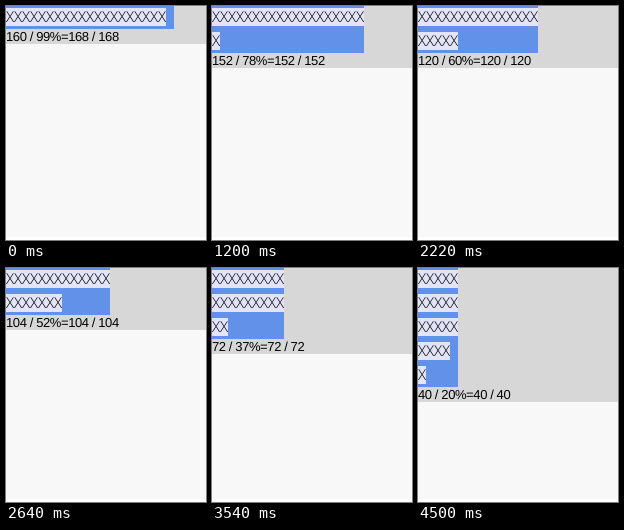
An HTML page with a canvas for the animation above (4.56 s loop, 200 px wide and 234 px high).

```html
<!DOCTYPE html>
<html lang="en">
<head>
<meta charset="utf-8">
<title>Wrapping box</title>
<style>
  html, body { margin: 0; width: 100%; height: 100%; overflow: hidden; background: #fff; }
  canvas { display: block; }
</style>
</head>
<body>
<canvas id="stage" width="200" height="234"></canvas>
<script>
const ctx = document.getElementById('stage').getContext('2d');
const STEP = 60, LOOP = 4560;
const CELL = 8, LINE = 24, COUNT = 20, STAGE_W = 200;

function rect(color, x, y, w, h) {
  ctx.fillStyle = color;
  ctx.fillRect(x, y, w, h);
}

// The last letter and the blank cell after it never part.
function wrap(cols) {
  if (cols > COUNT) return [COUNT];
  const rows = [];
  let left = COUNT;
  while (left + 1 > cols) {
    const n = Math.min(cols, left - 1);
    rows.push(n);
    left -= n;
  }
  rows.push(left);
  return rows;
}

function drawRow(n, i) {
  const top = i * LINE;
  rect('#e4e4f9', 0, top + 2, n * CELL, 18);
  ctx.fillStyle = '#000';
  ctx.font = '300 15px "Open Sans", "Noto Sans", sans-serif';
  ctx.textAlign = 'center';
  ctx.letterSpacing = '0px';
  for (let k = 0; k < n; k++) ctx.fillText('X', (k + 0.5) * CELL, top + 16);
}

function drawLabel(text, y) {
  ctx.fillStyle = '#000';
  ctx.font = '13px "Liberation Sans", Arial, sans-serif';
  ctx.textAlign = 'left';
  ctx.letterSpacing = '-0.4px';
  ctx.fillText(text, 0, y);
}

function draw(time) {
  const step = Math.floor((time % LOOP) / STEP);
  const percent = 99 - Math.floor(1.06 * step + 0.42);
  const rows = wrap(Math.floor(STAGE_W * percent / 100 / CELL));
  const textW = Math.max(...rows) * CELL;
  const boxW = rows.length === 1 ? textW + CELL : textW;
  const bottom = rows.length * LINE;

  rect('#fff', 0, 0, STAGE_W, 234);
  rect('#f8f8f8', 0, 0, STAGE_W, 231);
  rect('#d7d7d7', 0, 0, STAGE_W, bottom + 14);
  rect('#6191e8', 0, 0, boxW, bottom - 1);
  rows.forEach(drawRow);
  drawLabel(`${textW} / ${percent}%=${boxW} / ${boxW}`, bottom + 11);
}

ctx.textRendering = 'geometricPrecision';
const start = performance.now();
function tick() {
  draw(performance.now() - start);
  requestAnimationFrame(tick);
}
tick();
</script>
</body>
</html>
```
